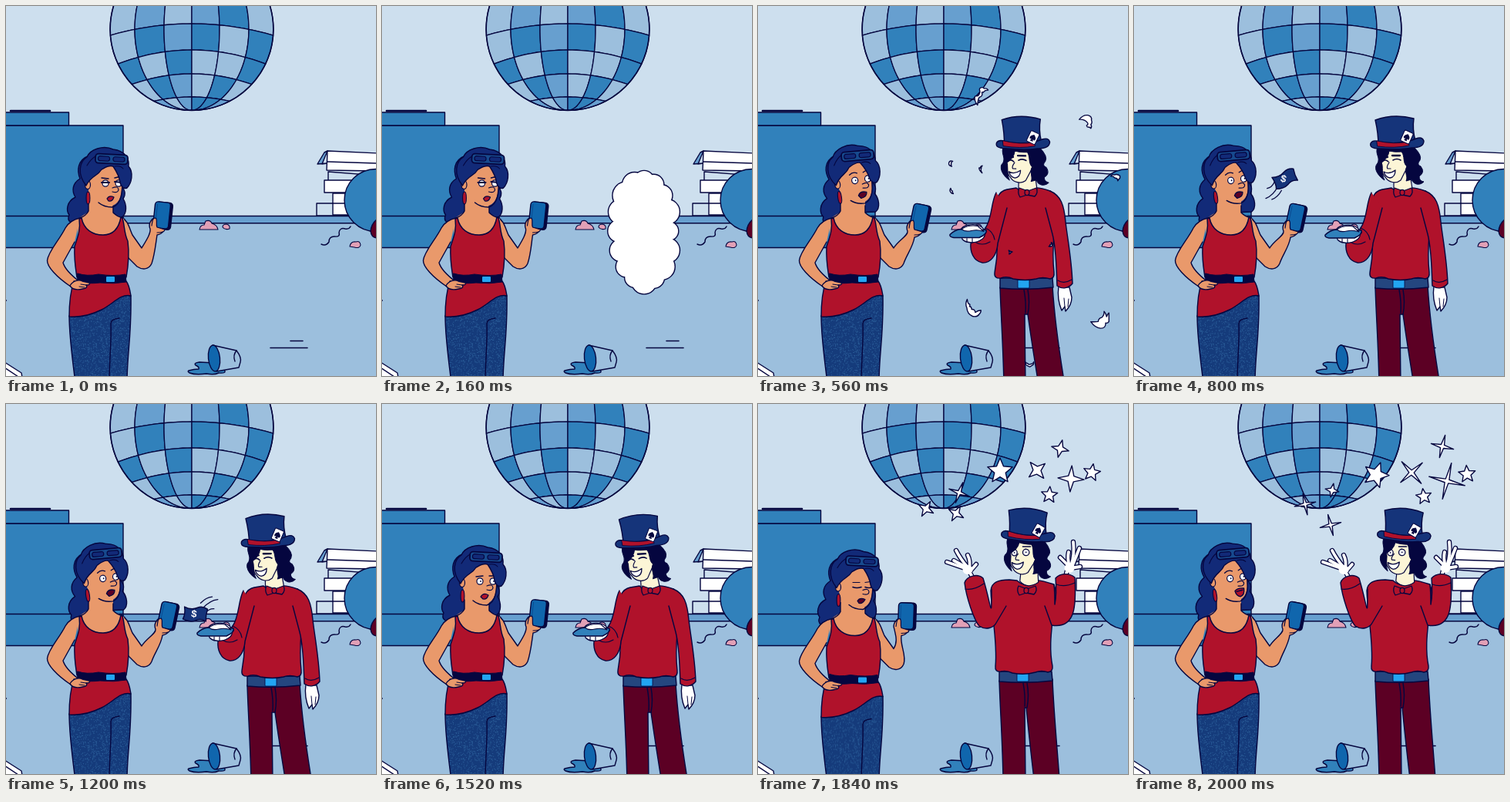
Recreate the animation shown at these times as an HTML page with a canvas. Size 480 by 480 pixels, loop 2080 ms.

```html
<!DOCTYPE html>
<html lang="en">
<head>
<meta charset="utf-8">
<title>Party trick</title>
<style>
html, body { margin: 0; width: 100%; height: 100%; overflow: hidden; background: #cddfee; }
canvas { display: block; width: 480px; height: 480px; }
</style>
</head>
<body>
<canvas id="stage" width="480" height="480"></canvas>
<script>
const c = document.getElementById('stage').getContext('2d');
const LOOP = 2080, STEP = 80, RAD = Math.PI / 180;
const INK = '#05063f', WALL = '#cddfee', FLOOR = '#9cbfdd', MID = '#679fcf', BLUE = '#3181bb',
  DEEP = '#1066ad', HAIR = '#122a78', HAT = '#15347a', SKIN = '#e9996b', RED = '#b0122b',
  WINE = '#5c0024', PALE = '#fcf5d6', CYAN = '#22a5f2', PINK = '#e2a0b6', WHITE = '#fff';

// ---- helpers ----
function shape(d, fill, w = 1.4, line = INK) {
  const p = new Path2D(d);
  if (fill) { c.fillStyle = fill; c.fill(p); }
  if (w) { c.strokeStyle = line; c.lineWidth = w; c.stroke(p); }
}
const line = (d, w = 1.4, color = INK) => shape(d, null, w, color);
function oval(x, y, rx, ry, fill, w = 1.4, rot = 0) {
  c.beginPath();
  c.ellipse(x, y, rx, ry, rot * RAD, 0, 7);
  if (fill) { c.fillStyle = fill; c.fill(); }
  if (w) { c.strokeStyle = INK; c.lineWidth = w; c.stroke(); }
}
function box(x, y, w, h, r, fill, lw = 1.4) {
  c.beginPath();
  c.roundRect(x, y, w, h, r);
  c.fillStyle = fill; c.fill();
  if (lw) { c.strokeStyle = INK; c.lineWidth = lw; c.stroke(); }
}
function at(x, y, rot, scale, fn) {
  c.save();
  c.translate(x, y); c.rotate(rot * RAD); c.scale(scale, scale);
  fn();
  c.restore();
}
const about = (x, y, dx, dy, rot, fn) => at(x + dx, y + dy, rot, 1, () => { c.translate(-x, -y); fn(); });
const lerp = (a, b, k) => a + (b - a) * k;
// blend two path strings of the same structure
function mix(a, b, k) {
  const num = /-?[\d.]+/g, to = b.match(num);
  let i = 0;
  return a.replace(num, n => lerp(+n, +to[i++], k).toFixed(2));
}
// rows of [time, ...values], linear between rows
function keys(t, rows) {
  if (t <= rows[0][0]) return rows[0].slice(1);
  for (let i = 1; i < rows.length; i++) {
    const a = rows[i - 1], b = rows[i];
    if (t <= b[0]) return a.slice(1).map((v, j) => lerp(v, b[j + 1], (t - a[0]) / (b[0] - a[0])));
  }
  return rows[rows.length - 1].slice(1);
}
function random(seed) {
  return () => (seed = (seed * 16807) % 2147483647) / 2147483647;
}
function makeDenim() {
  const tile = document.createElement('canvas'), g = tile.getContext('2d'), rnd = random(11);
  tile.width = tile.height = 96;
  g.fillStyle = '#153b7b'; g.fillRect(0, 0, 96, 96);
  g.fillStyle = '#2c5f9a';
  for (let i = 0; i < 1500; i++) g.fillRect(rnd() * 96, rnd() * 96, 1, 1);
  return c.createPattern(tile, 'repeat');
}
const DENIM = makeDenim();

// ---- room ----
const WIDTHS = [-106, -74, -36, 0, 36, 74, 106];
const RINGS = [[-25, 12], [23, 15], [57, 22], [88, 25], [118, 25], [135, 0]];
const TILES = ['LMLMBL', 'LBMBLB', 'BLBLLB', 'LBMLBL', 'MLMBBM'];

function ballPoint(w, ring) {
  const [y0, bend] = RINGS[ring];
  let x = 0, y = y0;
  for (let i = 0; i < 14; i++) {
    x = w * Math.sqrt(Math.max(0, 1 - ((y - 30) / 105.5) ** 2));
    y = y0 + bend * (x / 105.5) ** 2;
  }
  return [241 + x, y];
}
function meridian(w, r, back) {
  const [y0, y1] = [ballPoint(w, r)[1], ballPoint(w, r + 1)[1]];
  for (let i = 0; i <= 8; i++) {
    const y = lerp(y0, y1, (back ? 8 - i : i) / 8);
    c.lineTo(241 + w * Math.sqrt(Math.max(0, 1 - ((y - 30) / 105.5) ** 2)), y);
  }
}
function ball() {
  const color = { L: FLOOR, M: MID, B: BLUE };
  c.strokeStyle = INK; c.lineWidth = 1.3;
  TILES.forEach((row, r) => [...row].forEach((tile, i) => {
    const a = WIDTHS[i], b = WIDTHS[i + 1];
    c.beginPath();
    for (let k = 0; k <= 6; k++) c.lineTo(...ballPoint(lerp(a, b, k / 6), r));
    meridian(b, r, false);
    for (let k = 6; k >= 0; k--) c.lineTo(...ballPoint(lerp(a, b, k / 6), r + 1));
    meridian(a, r, true);
    c.closePath();
    c.fillStyle = color[tile]; c.fill(); c.stroke();
  }));
  oval(241, 30, 105.8, 105.5, null, 1.5);
}
function room() {
  c.fillStyle = WALL; c.fillRect(0, 0, 480, 480);
  c.fillStyle = FLOOR; c.fillRect(0, 282, 480, 198);
  shape('M-2 272.500H482V281.700H-2Z', MID);
  shape('M-2 155H152V313.500H-2Z', BLUE);
  shape('M-2 138H81.500V155H-2Z', BLUE);
  line('M-2 272.500H152');
  line('M6 136H57', 2.6);
  ball();
  // boxes, beanbag and litter
  shape('M403 256H445V272H403Z', WALL);
  shape('M424 243H482V271H424Z', WHITE);
  line('M424 256H482');
  shape('M418 215L482 220V228H418Z', WALL);
  shape('M413 226H482V242H413Z', WHITE);
  shape('M417 204L404 205L413 190L417 188L410 205Z', MID);
  shape('M417 188L482 191V214L416 213Z', WHITE);
  line('M417 202L482 204');
  oval(480, 252, 41, 40.5, BLUE);
  shape('M482 276Q474 282 473 292Q474 301 482 301Z', WINE);
  line('M409 309Q415 312 419 306Q419 299 426 299Q434 300 432 294Q433 287 440 289Q445 290 447 286');
  shape('M446 312Q447 305 454 306Q459 304 460 310Q459 315 452 313Z', PINK, 1.1);
  shape('M251 290Q252 284 257 284L259 279Q265 277 267 282Q274 284 275 290Z', PINK, 1.1);
  shape('M281 287Q281 283 286 283Q291 284 290 289Q284 291 281 287Z', PINK, 1.1);
  line('M369 434.500H385M343 443.500H391', 1.6);
  shape('M237 473Q244 471 250 471Q251 468 246 466Q243 463 251 462L270 463Q276 469 283 472Q287 477 276 476Q270 479 260 477Q246 479 238 476Q235 474 237 473Z', BLUE);
  shape('M268 440L299 447Q306 456 304 462L302 469L273 474Z', FLOOR);
  line('M299 447Q294 453 297 461');
  oval(270, 457, 7.500, 17, DEEP, 1.4, -6);
  shape('M-2 462L20 476L21 482H-2Z', WHITE);
  line('M-2 469L16 481');
  oval(0, 382, 1, 1, INK, 0);
}

// ---- woman ----
function eyesOpen(dots) {
  for (const x of [129, 146]) {
    oval(x, 230, 4, 4.2, WHITE, 1.2);
    if (dots) oval(x + 1, 230, 0.9, 0.9, INK, 0);
  }
}
const womanFaces = {
  half() {
    eyesOpen();
    line('M124 229L134 229M141 228L151 229', 2);
    line('M124 223L133 224M141 223L149 221');
    shape('M131 250Q134 245 140 248Q138 254 133 253Z', RED, 1.2);
  },
  closed() {
    line('M125 232Q130 234 136 232M141 232Q146 234 150 232', 1.6);
    line('M125 226L134 226M141 226L148 225', 1.2);
    shape('M131 250Q134 245 141 248Q138 254 133 253Z', WINE, 1.2);
  },
  shock() {
    eyesOpen(true);
    line('M123 222Q128 218 133 221M141 221Q146 218 149 220', 1.3);
    shape('M131 250Q134 244 142 247Q142 253 134 254Z', WINE, 1.3);
  },
  look() {
    eyesOpen(true);
    line('M124 224L133 223M141 223L149 223', 1.3);
    shape('M130 250Q134 244 140 248Q138 254 133 253Z', RED, 1.2);
  },
  happy() {
    eyesOpen(true);
    line('M123 222Q128 218 133 221M141 221Q146 218 149 220', 1.3);
    shape('M133 247Q137 243 145 245Q145 254 139 255Q134 254 133 247Z', RED, 1.4);
    line('M135 248L143 247', 1.5);
  }
};
function womanFace(t) {
  if (t < 240) return 'half';
  if (t < 400) return 'closed';
  if (t < 1360) return 'shock';
  if (t < 1760) return 'look';
  return t < 1920 ? 'closed' : 'happy';
}
function womanHairBack() {
  shape('M108 194C92 200 92 214 96 224C86 230 85 240 90 248C78 254 78 266 82 271C78 280 86 284 95 281L110 270L150 274C157 270 157 258 152 250C156 244 154 238 150 234L140 200Z', HAIR);
}
function womanHead(face) {
  shape('M106 212C104 235 108 252 122 259C140 264 149 254 150 240L152 222L148 204L122 201Z', SKIN, 0);
  line('M151 224C151 242 150 257 138 261Q127 261 120 255');
  oval(106, 232, 3.5, 5.5, SKIN, 1.2);
  oval(106.500, 249, 2.4, 8, RED, 1.1);
  face();
  shape('M138 236Q145 233 146 238Q146 243 138 241', SKIN, 1.2);
  shape('M104 233C92 218 95 202 105 196C109 186 126 180 139 186C156 188 160 200 159 208C166 216 163 230 157 236C153 238 149 234 148 229C147 220 143 214 139 208C133 206 128 210 124 212C118 222 111 219 104 233Z', HAIR);
  line('M105 207Q110 198 118 194M141 208Q149 207 152 211', 1.1);
  at(137, 198.500, 3, 1, () => {
    box(-21, -6, 42, 12, 4, '#174a8e', 1.8);
    box(-17.500, -3, 15, 6, 2.500, HAIR, 1.2);
    box(2, -3, 15, 6, 2.500, HAIR, 1.2);
  });
}
function womanArm(dx, dy, rot) {
  const X = 203 + dx, Y = 272 + dy, p = (x, y) => `${X + x} ${Y + y} `;
  shape(`M150 274C158 278 160 288 164 297L176 314C182 304 ${p(-15, 23)}${p(-16, 17)}C${p(-19, 10)}${p(-14, 4)}${p(-9, 2)}L${p(2, 19)}Q${p(-1, 24)}${p(-7, 25)}C${p(-9, 38)}193 322 189 334C185 343 176 342 170 338L158 326`, SKIN);
  at(X, Y, 6 + rot, 1, () => {
    box(-9, -17.500, 21, 35, 4, INK);
    box(-11, -17.500, 20, 34, 4, DEEP);
    line('M-8 -14V11', 0.9, '#0b4a90');
  });
  shape(`M${p(-14, 13)}C${p(-13, 7)}${p(-13, 3)}${p(-9, 3)}C${p(-6, 5)}${p(-9, 11)}${p(-7, 15)}L${p(3, 18)}Q${p(3, 22)}${p(-7, 22)}`, SKIN, 1.2);
}
function woman(t) {
  const [rot, hx, hy, px, py, pr, by] = keys(t, [
    [0, 0, 0, 0, 0, 0, 0, 0], [320, 0, 1, 0, -1, 0, 0, 0], [400, 1, 1, 2, -2, 1, -1, 1],
    [480, -6, 2, -2, 6, 2, 4, 0], [560, -8, 2, -3, 7, 3, 6, 0], [1280, -8, 2, -3, 7, 3, 6, 0],
    [1440, -1, -1, 0, 1, 1, 1, 0], [1520, 0, -2, 0, 0, 0, 0, 0], [1680, 0, -2, 1, -2, 0, 0, 0],
    [1840, 0, -2, 2, -10, 0, -4, 3.5], [1920, -5, 1, -1, 2, 1, 1, 1], [2000, -8, 1, -3, 6, 3, 5, 0]
  ]);
  const bob = t > 640 && t < 1280 ? Math.sin((t - 800) / 400 * Math.PI) : 0;
  const head = fn => about(122, 268, hx, hy, rot + bob, fn);
  c.save();
  c.translate(0, by);
  head(womanHairBack);
  shape('M82 402C82 430 86 455 90 490H157C157 450 163 430 162 376L140 372L92 385Z', DENIM);
  line('M147 405Q136 406 136 412C137 435 134 460 134 490');
  womanArm(px, py, pr);
  shape('M107 236V267L92 277L94 304H156L153 276L139 269V250Z', SKIN, 0);
  line('M139 259V268Q145 274 152 275M107 254V266Q104 272 96 275');
  shape('M96 275C87 277 81 281 77 288C69 304 55 318 53.500 330C53 338 66 352 84 364L96 358C84 349 76 340 74 333L89 306', SKIN);
  shape('M95 276C97 292 92 302 89 312C88 330 91 345 92 352H156C159 335 160 320 158 305C153 295 154 284 151 275L149 274C146 290 138 297 126 297C112 297 101 290 98 275Z', RED);
  shape('M88 357H156C160 362 161 370 162 376C148 373 140 386 124 394C108 402 94 404 82 403C82 388 83 372 88 357Z', RED);
  shape('M93 347Q105 351 120 348Q140 351 155 348L156 358Q140 361 122 359Q105 361 93 358Z', INK, 1);
  box(130, 351, 11, 7, 1, CYAN, 0);
  shape('M83 363C86 357 94 354 99 357L108 359Q110 362 104 362Q107 366 99 367Q88 370 83 363Z', SKIN, 1.3);
  line('M97 361L104 362M95 364L102 365', 1);
  head(() => womanHead(womanFaces[womanFace(t)]));
  c.restore();
}

// ---- man ----
function tubes(list, w) {
  for (const [extra, color] of [[2.6, INK], [0, WHITE]])
    for (const d of list) line(d, w + extra, color);
}
const GRIN = 'M324 215Q331 219 339 213Q339 222 332 223Q326 222 324 215Z';
const manFaces = {
  startled() {
    box(324, 198, 8, 5.5, 1, WHITE, 1.1);
    box(337, 197, 8.500, 5.5, 1, WHITE, 1.1);
    line('M323 195L332 196.500M336 195L347 193', 2.2);
    shape('M328 216Q332 212 335 216Q335 221 331 221Z', INK, 1);
    line('M332 220V228', 1.2);
  },
  grin() {
    line('M322 202Q326 198 330 202M336 200Q341 197 346 200', 1.6);
    line('M322 196L329 196M335 194L345 194', 2.3);
    shape(GRIN, WHITE, 1.3);
  },
  wide() {
    oval(326, 202, 3.6, 4, WHITE, 1.3);
    oval(341, 200, 4.2, 4.2, WHITE, 1.3);
    oval(326, 202, 0.9, 0.9, INK, 0);
    oval(341, 200, 0.9, 0.9, INK, 0);
    line('M321 195L328 194M336 193L346 192', 1.6);
    shape(GRIN, WHITE, 1.3);
  }
};
function manHead(face) {
  shape('M337 220V238Q348 248 361 237L357 212Z', PALE, 1.2);
  shape('M322 188C320 205 320 217 326 222C330 229 340 231 346 226L352 214L356 204L354 188Z', PALE, 1.2);
  face();
  line('M331 203Q327 209 329 211L333 211', 1.2);
  shape('M316 183C312 192 320 196 316 204C310 210 316 220 325 226C320 216 324 210 321 203Q330 197 331 188Q338 190 347 189C352 195 348 203 354 208C350 216 356 221 353 227L360 225C362 231 370 234 376 228Q370 227 370 221Q378 216 372 208Q366 206 371 200Q374 194 364 184Z', INK, 1);
  shape('M313 148Q337 139 363 146Q361 160 365 175L317 182Q317 165 313 148Z', HAT);
  shape('M307 178Q305 185 318 185Q345 187 360 184Q376 184 376 175Q374 169 366 172Q345 181 318 176Q310 173 307 178Z', HAT);
  shape('M315 175Q338 180 356 176L357 181Q338 185 316 182Z', RED, 0.9);
  at(354, 170, 24, 1, () => {
    box(-6, -7.500, 12, 15, 1.5, WHITE, 1);
    shape('M0 -4Q6 0 3 3L1 2L2 5H-2L-1 2L-3 3Q-6 0 0 -4Z', INK, 0);
  });
}
const TORSO = ['M322 238C312 240 306 250 307 270C311 300 310 325 306 346Q305 354 314 353Q322 350 330 354Q346 357 360 354Q368 351 378 354Q384 353 383 345C380 320 383 300 384 280C386 262 386 250 378 240Q364 235 358 236Q346 246 334 236Z',
  'M326 228C312 228 303 231 302 242C303 275 311 310 308 340Q307 348 315 347Q322 345 330 349Q346 352 360 348Q368 345 376 348Q383 347 382 340C378 320 380 300 382 282C387 262 388 245 384 234Q366 228 360 229Q348 240 336 229Z'];
const ARM_L = ['M308 242C301 255 303 275 294 288C290 294 284 304 275 308C274 318 278 331 290 333C300 334 309 324 310 308L322 262',
  'M303 240C303 285 303 262 292 226C284 219 270 224 268 232C270 250 280 280 287 288C296 294 306 290 309 284L322 262'];
const ARM_R = ['M378 240C392 246 396 258 398 280C401 305 406 330 407 360C402 366 394 368 387 363C386 340 386 315 381 296L372 262',
  'M384 235C385 244 385 254 385 260C387 250 387 238 386 226C392 219 404 219 411 225C413 262 412 292 381 287L372 262'];

function raisedHands(k) {
  c.save();
  c.translate(0, (1 - k) * 60);
  tubes(['M271 214L245 205', 'M270 212L254 203', 'M272 212Q262 200 257 190', 'M274 214Q276 204 272 196', 'M276 216L283 208', 'M272 214L279 226'], 3.8);
  oval(272, 215, 6.5, 6, WHITE, 0);
  tubes(['M404 211L392 199', 'M404 210Q401 200 403 192', 'M406 210Q411 196 409 179', 'M407 212L417 187', 'M405 213L418 211', 'M402 212L399 224'], 3.8);
  oval(404, 213, 6.5, 6, WHITE, 0);
  c.restore();
}
function heldPhone() {
  shape('M262 291C264 285 278 282 287 286C296 291 295 300 288 304C280 309 268 308 264 303Z', WHITE, 1.3);
  shape('M248 297Q254 291 262 290L295 291Q297 296 286 301L253 301Q247 300 248 297Z', BLUE, 1.5);
  shape('M263 290Q272 284 284 286L292 293Q284 290 276 292Q268 294 263 290Z', WHITE, 1.1);
  line('M270 302V307M277 302V307', 1.1);
}
function man(t) {
  const [k] = keys(t, [[1520, 0], [1600, -0.06], [1680, 0.55], [1760, 1.05], [1840, 1]]);
  const [rot, hx, hy, bx, lift] = keys(t, [[320, 6, 3, 0, 3, 5], [480, 3, 0, 1, 2, 1], [640, 0, 0, 0, 0, 0],
    [800, 0, 0, 0, 0, 0], [1200, -1, -0.5, 0, 0, 0], [1520, -3, -1, 0, 0, 0], [1600, -3, -1, 2, 0, 0],
    [1760, 7, 4, -9, 0, 0], [1840, 6, 3, -7, 0, 0]]);
  const bob = t > 640 && t < 1200 ? Math.sin((t - 800) / 200 * Math.PI) * 0.8 : 0;
  c.save();
  c.translate(bx, 0);
  c.save();
  c.translate(0, -6 * k);
  shape(mix('M313 365C314 400 317 440 318 492H346L345 400L349 400C353 430 358 460 363 492H397C390 450 384 410 381 363Z',
    'M313 365C314 400 317 440 318 492H347L346 400L348 400C351 430 354 460 358 492H391C388 450 384 410 382 363Z', k), WINE);
  line('M344 368Q347 384 346 398M349 368Q352 384 349 400');
  shape('M313 353L381 353L382 365Q348 369 313 366Z', '#24467f');
  box(336, 354, 15, 12, 1, CYAN, 0.8);
  c.restore();
  if (k > 0.4) raisedHands(k);
  else {
    shape('M389 364C387 378 390 388 393 395L397 390L398 396Q406 388 406 378L403 365Z', WHITE);
    line('M397 390L396 379M401 390L402 380', 1);
  }
  shape(mix(...TORSO, k), RED);
  shape(mix(...ARM_R, k), RED);
  shape(mix(...ARM_L, k), RED);
  if (k <= 0.4) {
    line('M294 288Q304 292 306 303M280 306Q290 312 300 306M388 356Q396 361 406 355', 1.2);
    at(0, -lift, 0, 1, heldPhone);
  } else line('M269 240Q280 242 293 233M387 234Q398 238 411 232', 1.2);
  const mood = t < 480 ? 'startled' : k > 0.4 ? 'wide' : 'grin';
  about(348, 235, hx, hy, rot + bob, () => manHead(manFaces[mood]));
  shape('M349 240L338 236Q335 242 339 248L348 245L358 247Q363 242 360 236Z', RED, 1.3);
  oval(348, 242, 3, 3.6, RED, 1.2);
  if (t < 480) line('M314 236L320 243M313 278L319 285M337 292L338 300M360 296L368 290M300 276L307 283M377 238L370 243', 1.2);
  c.restore();
}

// ---- smoke, money, stars ----
const WISPS = [
  [292, 120, 'M272 185Q256 165 257 146Q258 136 266 138Q276 140 281 127Q286 118 284 112Q278 98 290 94Q302 91 306 99Q322 95 327 107Q308 107 302 119Q291 114 296 126Q297 140 281 144Q273 156 272 185Z'],
  [424, 155, 'M380 148Q400 123 424 126Q447 132 443 151Q449 165 440 174Q447 186 440 194L432 188Q420 190 418 180Q430 172 421 163Q407 146 380 148Z'],
  [254, 208, 'M264 196Q248 191 244 205Q241 218 259 223Q252 216 257 211Q252 204 264 196Z'],
  [255, 242, 'M250 228Q242 240 251 250Q255 257 264 257Q257 250 260 243Q253 242 250 228Z'],
  [291, 215, 'M299 235Q283 220 283 208L289 210Q290 199 300 197Q293 205 294 214Q290 220 299 235Z'],
  [282, 390, 'M250 334Q238 356 248 378Q250 410 278 422Q300 428 312 412Q323 402 321 391Q305 392 292 402Q290 384 273 386Q272 371 262 371Q268 358 258 358Q251 348 250 334Z'],
  [440, 404, 'M389 406Q410 407 427 405Q430 386 446 384Q460 370 458 352Q468 362 471 380Q476 366 483 360V405Q476 416 466 412Q468 440 440 440Q412 438 389 406Z'],
  [458, 225, 'M435 220Q440 208 454 213Q468 206 483 218V230Q476 234 472 244Q470 229 458 230Q450 219 435 220Z'],
  [351, 457, 'M330 442Q334 454 343 453Q352 464 362 456Q372 458 376 446Q377 463 366 464Q356 476 346 467Q332 464 330 442Z'],
  [378, 309, 'M381 296Q390 302 386 311Q386 320 368 317L376 312Q370 307 382 306Z'],
  [328, 318, 'M319 309Q325 315 338 317L330 320Q330 327 321 328Q326 322 319 309Z']
];
function cloud(size) {
  const rnd = random(5), puffs = [];
  for (let i = 0; i < 16; i++) {
    const a = i / 16 * 2 * Math.PI;
    puffs.push([340 + Math.cos(a) * 72 * size, 292 + Math.sin(a) * 145 * size, (26 + rnd() * 14) * size]);
  }
  for (const [x, y, r] of puffs) oval(x, y, r, r, WHITE, 2.8);
  for (const [x, y, r] of puffs) oval(x, y, r, r, WHITE, 0);
  oval(340, 292, 75 * size, 148 * size, WHITE, 0);
}
function smoke(t) {
  if (t >= 160 && t < 320) cloud(t < 240 ? 0.45 : 1);
  if (t < 320 || t >= 640) return;
  const [size] = keys(t, [[320, 1], [400, 0.75], [480, 0.5], [560, 0.25]]);
  for (const [x, y, d] of WISPS) {
    const out = 1 + (1 - size) * 0.06;
    at(340 + (x - 340) * out, 290 + (y - 290) * out, 0, size, () => {
      c.translate(-x, -y);
      shape(d, WHITE, 1.4 / size);
    });
  }
}
function money(t) {
  if (t < 720 || t > 1280) return;
  const [x, y] = keys(t, [[720, 203, 254], [800, 195, 224], [880, 211, 197], [960, 244, 189],
    [1040, 272, 208], [1120, 271, 245], [1200, 245, 272], [1280, 219, 279]]);
  const k = (t - 800) / 400;
  at(x, y, lerp(130, 325, k), 1, () => line('M14 -7Q24 -9 31 -5M13 0Q26 -3 35 2M12 7Q19 5 24 9', 1.3));
  at(x, y, lerp(-24, 4, k), 1, () => {
    shape('M-14 -8Q-5 -4 3 -8Q9 -11 16 -7Q14 1 15 9Q8 5 1 9Q-6 12 -15 8Q-12 1 -14 -8Z', HAT);
    c.rotate(lerp(40, 4, k) * RAD);
    c.fillStyle = WHITE;
    c.font = 'bold 13px "Liberation Sans", Arial, sans-serif';
    c.textAlign = 'center'; c.textBaseline = 'middle';
    c.fillText('$', -1, 1);
  });
}
function star(x, y, r, points, inner, rot) {
  c.beginPath();
  for (let i = 0; i < points * 2; i++) {
    const a = rot * RAD - Math.PI / 2 + i * Math.PI / points, d = i % 2 ? r * inner : r;
    c.lineTo(x + Math.cos(a) * d, y + Math.sin(a) * d);
  }
  c.closePath();
  c.fillStyle = WHITE; c.fill();
  c.strokeStyle = INK; c.lineWidth = 1.4; c.stroke();
}
// start x, y, points, then x, y, radius, inner, turn at two moments
const STARS = [
  [350, 130, 5, 314, 87, 17, 0.45, 0, 314, 92, 17, 0.45, 20],
  [402, 172, 5, 433, 89, 11.5, 0.45, 10, 432, 91, 11.5, 0.45, -4],
  [395, 172, 5, 378, 118, 11, 0.45, 4, 376, 120, 10.5, 0.45, -8],
  [402, 172, 4, 392, 58, 11.5, 0.36, 14, 400, 55, 15, 0.2, 14],
  [385, 150, 4, 362, 86, 13.5, 0.38, -40, 360, 89, 19, 0.17, -42],
  [402, 172, 4, 406, 97, 17, 0.3, 4, 406, 100, 24, 0.14, 14],
  [266, 195, 4, 218, 136, 11, 0.36, 30, 222, 130, 14, 0.18, -12],
  [266, 195, 4, 261, 115, 14, 0.2, 20, 257, 112, 9, 0.36, 12],
  [266, 195, 4, 257, 142, 11, 0.36, 30, 255, 157, 14, 0.18, -14]
];
function stars(t) {
  if (t < 1680) return;
  const [grow] = keys(t, [[1680, 0.4], [1760, 0.78], [1840, 1]]);
  const k = Math.max(0, (t - 1840) / 160);
  for (const [sx, sy, n, ...v] of STARS) {
    const [x, y, r, inner, rot] = [0, 1, 2, 3, 4].map(i => lerp(v[i], v[i + 5], k));
    star(lerp(sx, x, grow), lerp(sy, y, grow), r * grow, n, inner, rot);
  }
}

function draw(now) {
  let t = Math.floor((now % LOOP) / STEP) * STEP;
  if (t < 160) t = 0;
  c.setTransform(1, 0, 0, 1, 0, 0);
  c.lineJoin = c.lineCap = 'round';
  room();
  if (t >= 240) man(t);
  smoke(t);
  money(t);
  woman(t);
  stars(t);
}
const start = performance.now();
function tick() {
  draw(performance.now() - start);
  requestAnimationFrame(tick);
}
tick();
</script>
</body>
</html>
```
